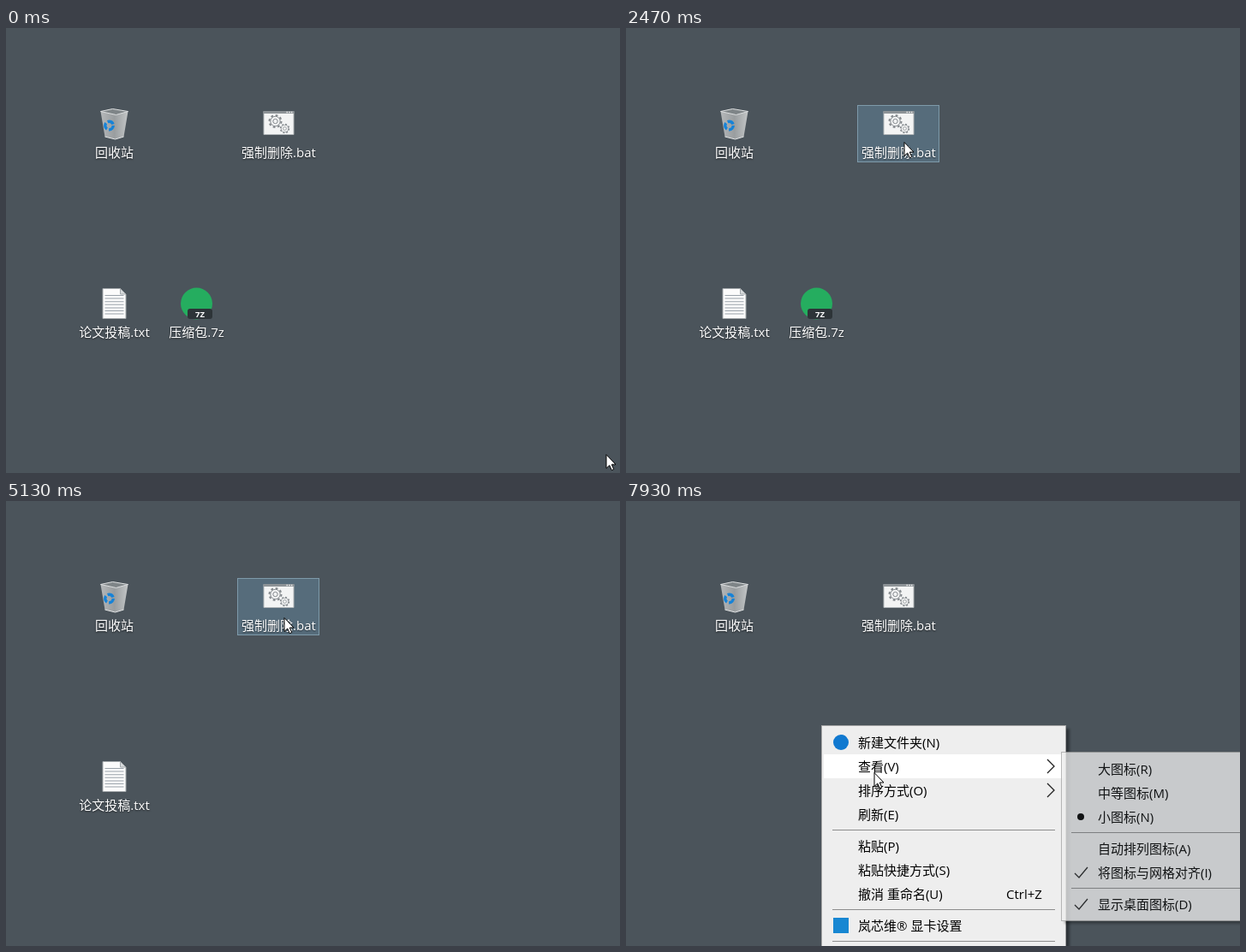
Animation of 717 by 520 pixels, one loop 8 s. Source, as an HTML page:

```html
<!DOCTYPE html>
<html lang="zh-CN">
<head>
<meta charset="utf-8">
<title>桌面</title>
<style>
  html, body { margin: 0; width: 100%; height: 100%; overflow: hidden; background: #4b545b; }
  svg { display: block; width: 100vw; height: 100vh; }
  text { font: 15px "Open Sans", "Noto Sans CJK SC", "Noto Sans CJK", sans-serif; }
  .label { fill: #fff; text-anchor: middle; text-shadow: 0 1px 2px #0009; }
  .panel { fill: #eee; stroke: #a5a5a5; }
  .shadow { fill: #000; opacity: .38; filter: blur(1.5px); }
  .rule { stroke: #8d8d8d; }
  .mark { stroke: #222; stroke-width: 1.3; fill: none; }
  .gear { fill: none; stroke: #858a8e; }
  .edge { stroke: #a3a8ab; }
  .badge { font-size: 9.5px; font-weight: 700; text-anchor: middle; fill: #fff; }
  #hover { fill: #78b4dc; fill-opacity: .25; stroke: #7e9aaa; }
  #ghost { opacity: .6; }
  #submenu { opacity: .77; }
</style>
</head>
<body>
<svg viewBox="0 0 717 520">
  <defs>
    <g id="gear">
      <circle class="gear" r="7" stroke-width="2" stroke-dasharray="2.75 2.75"/>
      <circle class="gear" r="5.7"/>
      <circle class="gear" r="2.7"/>
    </g>
    <linearGradient id="glass">
      <stop offset="0" stop-color="#b5b8ba"/>
      <stop offset=".5" stop-color="#999d9f"/>
      <stop offset="1" stop-color="#c3c6c7"/>
    </linearGradient>
  </defs>

  <rect width="717" height="520" fill="#4b545b"/>
  <rect id="hover" x="-47.5" width="95" height="66"/>

  <!-- Each icon is drawn around the top centre of its grid cell. -->
  <g id="bin">
    <path d="M-16 7.500-11 37 1 40 11 37 16 7.500 2 11.500Z" fill="url(#glass)"/>
    <path d="M-16 7.500-2 4.500 16 7.500 2 11.500Z" fill="#7f8588" stroke="#dfe1e2"/>
    <path d="M-11 37 1 40 11 37" fill="none" stroke="#e2e4e5"/>
    <circle cx="-6" cy="24" r="4.700" fill="none" stroke="#1683d8" stroke-width="3.400" stroke-dasharray="7.600 2.240"/>
    <text class="label" y="61">回收站</text>
  </g>

  <g id="script">
    <path d="M-17.500 7.500H17.500V34.500H-17.500Z" fill="#f3f4f4" stroke="#aeb3b6"/>
    <path d="M-18 8.500H18" stroke="#8d9397" stroke-width="3"/>
    <path d="M9 8.500H16" stroke="#eee" stroke-width="1.500" stroke-dasharray="1.500 1.200"/>
    <use href="#gear" x="-4" y="19"/>
    <use href="#gear" transform="translate(7 27.500) scale(.72)"/>
    <text class="label" y="61">强制删除.bat</text>
  </g>

  <g id="paper">
    <path class="edge" d="M-13.500 4.500H7L13.500 11V39.500H-13.500Z" fill="#fbfbfb"/>
    <path class="edge" d="M7 4.500V11H13.500Z" fill="#d7dadc"/>
    <path d="M0 12V37" stroke="#9aa2aa" stroke-width="22" stroke-dasharray="1 2.600"/>
    <text class="label" y="61">论文投稿.txt</text>
  </g>

  <g id="archive">
    <circle cy="22" r="18.500" fill="#25ad5f"/>
    <rect x="-10.500" y="28" width="29" height="12" rx="3" fill="#2d3438"/>
    <text class="badge" x="4" y="37.500">7Z</text>
    <text class="label" y="61">压缩包.7z</text>
  </g>

  <use id="ghost"/>

  <g id="tip">
    <rect x="11.500" y="41.500" width="177" height="25" fill="#fff" class="edge"/>
    <path d="M17 54H26M22.500 50 26.500 54 22.500 58" stroke="#1f6fc4" stroke-width="2" fill="none"/>
    <text x="30" y="59.500" fill="#44597a">使用 <tspan fill="#0b3f94">强制删除.bat</tspan> 打开</text>
  </g>

  <g id="menu" transform="translate(228 262)">
    <rect class="shadow" x="4" y="4" width="286" height="270"/>
    <rect class="panel" x=".5" y=".5" width="285" height="270"/>
    <rect id="row" x="3" width="280" height="28" fill="#fff"/>
    <circle cx="23" cy="20" r="9" fill="#1179d0"/>
    <rect x="14" y="225" width="18" height="18" fill="#1787d2"/>
    <path id="chevron" class="mark" d="M264 40 272 48 264 56"/>
    <use href="#chevron" y="28"/>
    <text x="216" y="203">Ctrl+Z</text>
  </g>

  <g id="submenu" transform="translate(508 293)">
    <rect class="shadow" x="4" y="4" width="220" height="197"/>
    <rect class="panel" x=".5" y=".5" width="220" height="197"/>
    <circle cx="23" cy="76" r="4"/>
    <path id="check" class="mark" d="M16 142 21 147 31 135"/>
    <use href="#check" y="37"/>
  </g>

  <path id="cursor" d="M0 .5V16.500L3.700 13 6.300 18.700 8.700 17.600 6.300 12H11Z" fill="#fff" stroke="#000"/>
</svg>

<script>
  const LOOP = 8000, TICK = 1000 / 15;
  const CELL_W = 96, CELL_H = 105, ROW = 28, GAP = 9;
  const $ = id => document.getElementById(id);
  const show = (id, on) => { $(id).style.display = on ? "" : "none"; };
  const move = (id, x, y) => $(id).setAttribute("transform", `translate(${x} ${y})`);

  function add(parent, tag, attributes, text = "") {
    const node = document.createElementNS("http://www.w3.org/2000/svg", tag);
    for (const name in attributes) node.setAttribute(name, attributes[name]);
    node.textContent = text;
    $(parent).append(node);
  }

  // "-" stands for a separator line.
  function fillMenu(id, ruleX, ruleEnd, labels) {
    let y = 20;
    for (const label of labels.split("|")) {
      if (label === "-") {
        add(id, "path", { class: "rule", d: `M${ruleX} ${y - 9.5}H${ruleEnd}` });
        y += GAP;
      } else {
        add(id, "text", { x: 43, y: y + 5.5 }, label);
        y += ROW;
      }
    }
  }
  fillMenu("menu", 13, 273, "新建文件夹(N)|查看(V)|排序方式(O)|刷新(E)|-|粘贴(P)|粘贴快捷方式(S)|撤消 重命名(U)|-|岚芯维® 显卡设置|-");
  fillMenu("submenu", 12, 209, "大图标(R)|中等图标(M)|小图标(N)|-|自动排列图标(A)|将图标与网格对齐(I)|-|显示桌面图标(D)");

  const icon = (id, col, row, gone = Infinity) =>
    ({ id, gone, x: 126.5 + col * CELL_W, y: 90 + row * CELL_H });
  const icons = [
    icon("bin", 0, 0), icon("script", 2, 0),
    icon("paper", 0, 2, 84), icon("archive", 1, 2, 40)
  ];
  icons.forEach(({ id, x, y }) => move(id, x, y));

  // Cursor moves between ticks; a dragged icon is held until the drop tick.
  const home = [701, 498];
  const moves = [
    { from: 0, to: 5, at: [345, 487] },
    { from: 5, to: 8, at: [312, 427] },
    { from: 13, to: 20, at: [222, 328] },
    { from: 22, to: 29, at: [323, 132], drag: "archive", drop: 33 },
    { from: 36, to: 45, at: [395, 175] },
    { from: 45, to: 52, at: [180, 328] },
    { from: 52, to: 56, at: [137, 357] },
    { from: 57, to: 60, at: [130, 335] },
    { from: 63, to: 71, at: [325, 136], drag: "paper", drop: 77 },
    { from: 83, to: 90, at: [333, 200] },
    { from: 90, to: 96, at: [283, 262] },
    { from: 100, to: 104, at: [228, 262] },
    { from: 110, to: 111, at: [235, 268] },
    { from: 111, to: 119, at: [290, 317] }
  ];
  moves.forEach((m, i) => { m.start = i ? moves[i - 1].at : home; });

  const smooth = p => p * p * (3 - 2 * p);

  function draw(ms) {
    const tick = Math.min(119, Math.floor((ms + 5) / TICK));
    const current = moves.findLast(m => m.from <= tick);
    const p = smooth(Math.min(1, (tick - current.from) / (current.to - current.from)));
    const [x, y] = current.start.map((a, i) => Math.round(a + (current.at[i] - a) * p));
    move("cursor", x, y);

    const present = icons.filter(i => tick < i.gone);
    icons.forEach(i => show(i.id, present.includes(i)));

    const over = present.find(i => Math.abs(x - i.x) < 47.5 && y > i.y && y < i.y + 66);
    show("hover", over);
    if (over) move("hover", over.x - .5, over.y + .5);

    const dragging = current.drag && tick > current.from && tick < current.drop;
    show("ghost", dragging);
    show("tip", dragging && over?.id === "script");
    if (dragging) {
      $("ghost").setAttribute("href", "#" + current.drag);
      move("ghost", x - current.start[0], y - current.start[1]);
      move("tip", x, y);
    }

    show("menu", tick >= 112);
    show("submenu", tick >= 119);
    $("row").setAttribute("y", y < 296 ? 6 : 6 + ROW);
  }

  const start = performance.now();
  function frame() {
    draw((performance.now() - start) % LOOP);
    requestAnimationFrame(frame);
  }
  frame();
</script>
</body>
</html>
```
